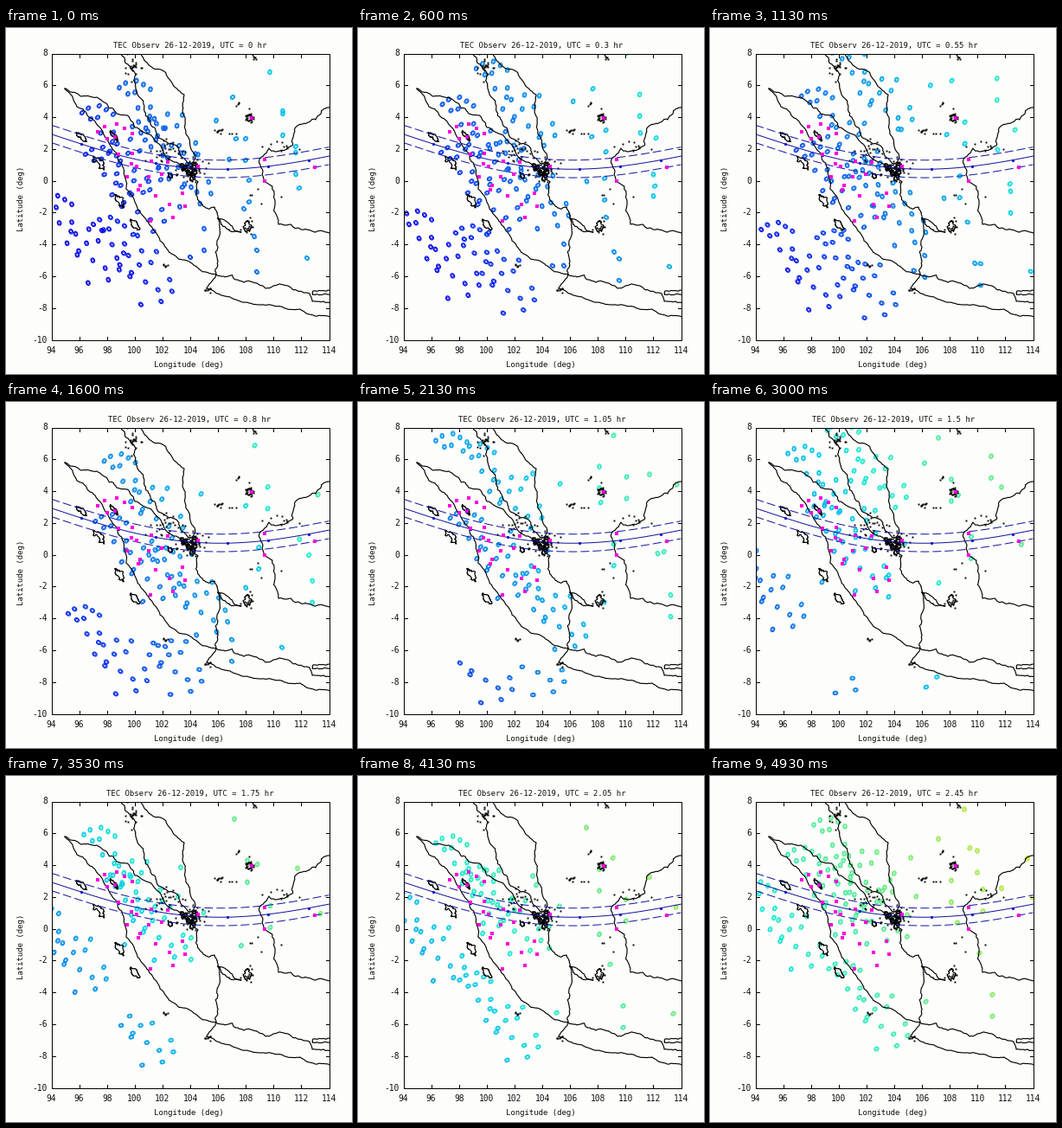
A matplotlib script for the animation above (5 s loop, 400 by 400 pixels).

```python
import numpy as np
import matplotlib.pyplot as plt
from matplotlib.animation import FuncAnimation
from matplotlib.patches import Rectangle

STEPS, HOURS_PER_STEP = 50, 0.05
PX = 0.72                                  # points per pixel at 100 dpi
L, R, T, B = 52.5, 373.5, 29.5, 360.5      # plot box
FONT = dict(family="DejaVu Sans Mono", color="#101010", va="center")
NAVY, MAGENTA = "#1414a0", "#ff00dc"
rng = np.random.default_rng(12)

fig = plt.figure(figsize=(4, 4), dpi=100, facecolor="#fdfdfb")
ax = fig.add_axes([0, 0, 1, 1])
ax.set(xlim=(0, 400), ylim=(400, 0))
ax.axis("off")
box = Rectangle((L, T), R - L, B - T, fill=False, ec="black", lw=PX, zorder=6)
ax.add_patch(box)


def line(x, y, color="black", width=1.0, **kw):
    art, = ax.plot(x, y, color=color, lw=width * PX, **kw)
    art.set_clip_path(box)
    return art


def label(x, y, text, size=9.0, **kw):
    return ax.text(x, y, text, fontsize=size * PX, **{"ha": "center", **FONT, **kw})


def spots(xy, color, size, marker="s", zorder=5):
    return line(*np.transpose(xy), color, ls="", marker=marker,
                ms=size * PX, mew=0, zorder=zorder)


def coast(*pts, rough=0.1):
    """Fractal shoreline: displaced midpoints between a few guide points."""
    p = np.array(pts, float)
    while len(p) < 14 * len(pts):
        gap = np.hypot(*np.diff(p, axis=0).T)[:, None]
        mid = (p[:-1] + p[1:]) / 2 + rng.normal(0, rough, (len(gap), 2)) * gap
        out = np.empty((2 * len(p) - 1, 2))
        out[::2], out[1::2] = p, mid
        p = out
    line(*p.T, width=1.15, zorder=3)


def island(x, y, length, width, tilt):
    a = np.linspace(0, 2 * np.pi, 7)
    z = (length * np.cos(a) + 1j * width * np.sin(a)) * np.exp(1j * tilt)
    coast(*np.c_[x + z.real, y + z.imag], rough=0.2)


def specks(x, y, spread, count):
    xy = rng.normal((x, y), spread, (count, 2))
    spots(xy, "black", 1.9, zorder=3)


# Axes and labels
line([0, 400], [0.5, 0.5], "#e4e4b8").set_clip_path(None)
for lon in range(94, 115, 2):
    x = L + (lon - 94) * (R - L) / 20
    for edge, tick in ((T, 4), (B, -4)):
        line([x, x], [edge, edge + tick], zorder=6)
    label(x, 372.5, lon, 9.6)
for lat in range(-10, 9, 2):
    y = T + (8 - lat) * (B - T) / 18
    for edge, tick in ((L, 4), (R, -4)):
        line([edge, edge + tick], [y, y], zorder=6)
    label(48, y, lat, 9.6, ha="right")
label(211, 390, "Longitude (deg)")
label(18, 197, "Latitude (deg)", rotation=90)
title = label(212.5, 20.5, "")

# Sumatra, east then west side
coast((68, 70), (105, 80), (128, 99), (149, 115), (180, 139), (206, 162),
      (222, 178), (228, 206), (241, 207), (245, 220), (244, 265), (243, 285))
coast((68, 70), (82, 91), (103, 108), (129, 146), (138, 174), (160, 219),
      (178, 246), (204, 268), (228, 282), (243, 285), rough=0.06)
# Malay peninsula
coast((133, 30), (148, 50), (150, 70), (164, 103), (187, 133), (213, 157))
coast((156, 30), (162, 39), (185, 52), (206, 77), (204, 90), (208, 120),
      (219, 150), (213, 157), rough=0.07)
# Borneo
coast((374, 92), (358, 106), (334, 116), (331, 136), (304, 139), (293, 152),
      (299, 178), (308, 183), (311, 200), (315, 227), (341, 233), (374, 237))
# Java
coast((232, 301), (243, 285), (268, 291), (300, 301), (326, 298), (351, 307),
      (354, 316), (374, 317), rough=0.08)
coast((232, 301), (253, 310), (296, 320), (340, 325), (374, 334), rough=0.05)
coast((374, 303), (355, 304), (354, 308), (374, 308), rough=0.06)
# Bangka, Belitung and the western chain
coast((245, 220), (258, 226), (272, 236), (254, 231), (245, 220))
island(279, 230, 5, 6, 0)
island(87, 126, 8, 2.5, 0.7)
island(107, 156, 10, 4, 0.9)
island(131, 200, 9, 3.5, 1.0)
island(149, 227, 8, 2, 0.9)
island(125, 125, 7, 2, 0.9)
island(281, 104, 4, 4, 0.5)
for x, y in rng.normal((211, 163), (8, 6), (14, 2)):
    island(x, y, *rng.uniform(1, 4, 2), 0.7)
specks(211, 162, (10, 8), 50)               # Riau
specks(183, 140, (10, 8), 25)
specks(145, 44, (5, 9), 25)                 # Langkawi coast
specks(282, 103, (2.5, 3), 18)              # Natuna
specks(246, 119, (2.5, 1.5), 10)            # Anambas
specks(268, 88, (2, 1), 4)
specks(287, 33, (2, 2), 6)
specks(262, 122, (2, 1), 3)
specks(320, 138, (9, 4), 10)
specks(280, 229, (4, 5), 12)
specks(236, 302, (3, 2), 8)
specks(185, 275, (2, 1), 6)
specks(292, 205, (22, 14), 6)

# Eclipse path: centre line and limits
guide = [53, 100, 150, 200, 255, 303, 374], [123, 138, 152, 160.5, 163, 160, 148]
curve = np.poly1d(np.polyfit(*guide, 4))
xs = np.linspace(L, R, 200)
line(xs, curve(xs), NAVY, zorder=4)
for shift in (-10.5, 9.8):
    line(xs, curve(xs) + shift, NAVY, zorder=4, dashes=(10, 4))
marks = np.array([87, 130, 173, 256, 303, 350])
spots(np.c_[marks, curve(marks)], "#0a0ac8", 3.2, "o")

# Receivers: a dense network on Sumatra, a few remote ones
network = np.array([
    (106, 120), (114, 114), (128, 111), (137, 116), (146, 122), (117, 128),
    (126, 126), (130, 146), (146, 145), (151, 160), (145, 157), (168, 154),
    (187, 155), (180, 169), (165, 172), (140, 172), (155, 182), (153, 187),
    (173, 194), (189, 204), (207, 206), (193, 219), (204, 191), (167, 223)], float)
remote = np.array([(222, 160), (284, 104), (299, 152), (299, 177), (357, 161)], float)
sites = np.vstack([network, remote])
spots(sites, MAGENTA, 4.4)

# The view angle pulls the pierce points of the dense network together
squeeze = np.vstack([0.1 * (network - (146, 140)), 0 * remote])

# Satellites: reach, then start, speed and bend of the pierce point offset
# from a receiver, as x + iy in pixels and hours
SATS = [
    (132, -70 + 80j, 24 + 63j, 20 - 12j),
    (125, -9 + 105j, 38 + 39j, 6 - 20j),
    (118, -95 + 85j, 50 + 53j, -19j),
    (112, -163 + 166j, 62 - 101j, -10 + 15j),
    (106, 21 - 53j, 16 - 74j, 10),
    (106, -22 - 24j, 32 - 30j, -9j),
    (80, -20 - 112j, 33j, 0),
    (92, 10 - 237j, 70j, 0),
    (98, 36 - 8j, 20 + 88j, 5 - 12j),
    (90, -18 + 24j, 14 - 6j, -5j),
]


def pierce(hour):
    """Visible pierce points, each drawn twice along its drift."""
    found = []
    for reach, start, speed, bend in SATS:
        pos = start + speed * hour + bend * hour ** 2
        drift = speed + 2 * bend * hour
        offset = (pos.real, pos.imag) - squeeze
        seen = np.hypot(*offset.T) < reach
        nudge = 0.7 * np.array([drift.real, drift.imag]) / abs(drift)
        pts = (sites + offset)[seen]
        found += [pts - nudge, pts + nudge]
    return np.vstack(found)


def tint(pts, hour):
    x, y = pts.T
    level = 0.04 + 0.07 * hour + 0.012 * hour ** 2 + 0.0007 * (x - L) + 0.0004 * (B - y)
    rgba = plt.cm.jet(np.clip(level, 0.09, 0.66))
    rgba[:, :3] *= 0.92
    return rgba


dots = ax.scatter([], [], s=(4.1 * PX) ** 2, facecolors="none",
                  linewidths=1.1 * PX, zorder=2.5)
dots.set_clip_path(box)


def draw(i):
    hour = i * HOURS_PER_STEP
    pts = pierce(hour)
    dots.set_offsets(pts)
    dots.set_edgecolors(tint(pts, hour))
    title.set_text(f"TEC Observ 26-12-2019, UTC = {hour:.3g} hr")
    return dots, title


anim = FuncAnimation(fig, draw, frames=STEPS, interval=100, repeat=True, repeat_delay=0)
plt.show()
```
